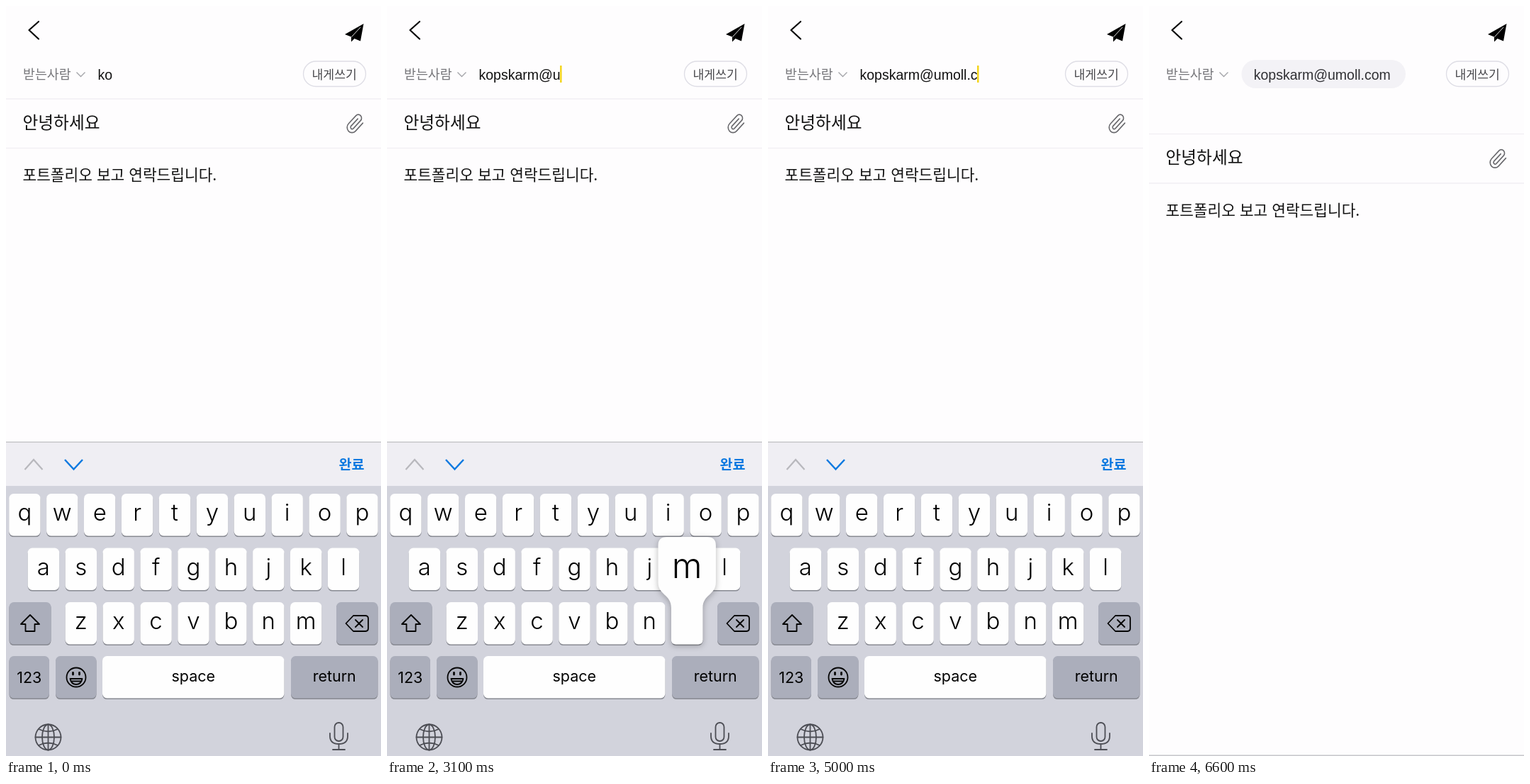
Recreate the animation shown at these times as an HTML page. Size 529 by 1058 pixels, loop 6700 ms.

```html
<!DOCTYPE html>
<html lang="ko">
<head>
<meta charset="utf-8">
<style>
  html, body { margin: 0; width: 100%; height: 100%; overflow: hidden; background: #fefdfe; }
  svg { display: block; width: 529px; height: 1058px; }
  .ko { font-family: "Noto Sans CJK KR", "Noto Sans CJK", sans-serif; font-weight: 350; }
  .key { font-family: Inter, Roboto, sans-serif; text-anchor: middle; }
  .thin { font-weight: 300; }
  .mail { font: 19.5px "Liberation Sans", Arial, sans-serif; }
  .line { fill: none; stroke: #050505; stroke-width: 1.8; stroke-linejoin: round; stroke-linecap: round; }
  #pop path { fill: #fefefe; filter: drop-shadow(0 2px 4px rgba(0, 0, 0, .28)); }
</style>
</head>
<body>
<svg id="stage" viewBox="0 0 529 1058">
  <path class="line" style="stroke-width:2.2" d="M46 22 32.5 34 46 46.5"/>
  <path d="M504.5 25 500 49.5 491.5 46 487 50.5V43.5L478 40Z"/>
  <path d="M500 30 487.5 43.5" stroke="#fefdfe" stroke-width=".9"/>
  <text class="ko" x="24" y="103" font-size="18.4" fill="#77777b">받는사람</text>
  <path d="M99.5 93.5l6 6 6-6" fill="none" stroke="#a5a5aa" stroke-width="1.4"/>
  <rect x="419.5" y="78" width="88" height="35.5" rx="17.7" fill="none" stroke="#dedde5" stroke-width="1.3"/>
  <text class="ko" x="431.5" y="102.5" font-size="17.2" fill="#47474b">내게쓰기</text>
  <rect id="chip" x="130.5" y="76" width="231.5" height="40" rx="20" fill="#f3f2f6"/>
  <text id="mail" class="mail" y="104"></text>
  <rect id="caret" y="84" width="2.5" height="24" fill="#f3d51c"/>
  <g id="letter">
    <path d="M0 131H529M0 200.5H529" stroke="#f1f0f4" stroke-width="1.3"/>
    <text class="ko" x="23.5" y="172.5" font-size="23.7" fill="#111">안녕하세요</text>
    <path transform="translate(479 151.5) scale(1.14 1.24)" fill="none" stroke="#68686c" stroke-width="1.4" stroke-linecap="round"
      d="M21.4 11l-9.2 9.2a6 6 0 0 1-8.5-8.5l9.2-9.2a4 4 0 0 1 5.7 5.7l-9.2 9.2a2 2 0 0 1-2.8-2.8l8.5-8.5"/>
    <text class="ko" x="23.5" y="246" font-size="21.4" fill="#111">포트폴리오 보고 연락드립니다.</text>
  </g>
  <g id="board">
    <rect y="614.5" width="529" height="63" fill="#efeef3"/>
    <rect y="614.5" width="529" height="1.5" fill="#c8c8cb"/>
    <rect y="677" width="529" height="381" fill="#d2d3dc"/>
    <path d="M26.5 654 39 640 51.5 654" fill="none" stroke="#b8b8bd" stroke-width="2.2"/>
    <path d="M83 640 95.5 653.5 108 640" fill="none" stroke="#0b79e0" stroke-width="2.5"/>
    <text id="done" class="ko" x="469.5" y="653.5" font-size="19.6" style="font-weight:700">완료</text>
    <g id="common"></g>
    <g id="abc"></g>
    <g id="sym"></g>
    <g id="icons" class="line">
      <path d="M490 860H507q4 0 4 4V878q0 4-4 4H490L479.5 871ZM493 866l10 10m0-10-10 10"/>
      <circle cx="99" cy="947" r="13.5"/>
      <path d="M90.5 949H107.5Q106 957 99 957T90.5 949ZM92 952.5H106"/>
      <path d="M94.5 940.5v2.5m9-2.5v2.5" stroke-width="2.8"/>
      <g style="stroke:#4d4e55">
        <circle cx="59.5" cy="1031.5" r="18"/>
        <ellipse cx="59.5" cy="1031.5" rx="8.5" ry="18"/>
        <path d="M59.5 1013.5v36M41.5 1031.5h36M46 1020q13.5 7 27 0M46 1043q13.5-7 27 0"/>
        <rect x="463.5" y="1011" width="12" height="26" rx="6"/>
        <path d="M457 1026v4q0 11 12.5 11T482 1030v-4M469.5 1041V1049M461 1049h17"/>
      </g>
    </g>
    <g id="pop"><path/><text class="key thin" font-size="49"/></g>
  </g>
</svg>
<script>
const $ = id => document.getElementById(id);
const LOOP = 6700, STEP = 100, PITCH = 52.9, ROWS = [688, 764.5, 841, 917];
const abc = $('abc'), sym = $('sym'), common = $('common');
const keys = {};

function add(parent, tag, attrs, text = '') {
  const node = document.createElementNS('http://www.w3.org/2000/svg', tag);
  for (const name in attrs) node.setAttribute(name, attrs[name]);
  node.textContent = text;
  return parent.appendChild(node);
}

function key(parent, x, row, w, label, size, drop, dark) {
  const y = ROWS[row], box = { x, width: w, height: 59.5, rx: 6.5 };
  add(parent, 'rect', { ...box, y: y + 1.6, fill: '#888a92' });
  add(parent, 'rect', { ...box, y, fill: dark ? '#abaebb' : '#fefefe' });
  add(parent, 'text', { class: size > 30 ? 'key thin' : 'key', x: x + w / 2, y: y + drop, 'font-size': size }, label);
  keys[label] = { x, y, w };
}

function keyRow(parent, chars, x, row, size, drop, w = 44.4, step = PITCH) {
  [...chars].forEach((c, i) => key(parent, x + i * step, row, w, c, size, drop));
}

keyRow(abc, 'qwertyuiop', 4.2, 0, 33, 38);
keyRow(abc, 'asdfghjkl', 30.7, 1, 33, 38);
keyRow(abc, 'zxcvbnm', 83.6, 2, 33, 38);
key(abc, 4.5, 2, 59, '', 20, 0, true);
key(abc, 4.5, 3, 56.5, '123', 21.5, 37.5, true);
add(abc, 'path', { class: 'line', d: 'M34 859 47 872H40.5V882H27.5V872H21Z' });
keyRow(sym, '1234567890', 4.2, 0, 30.5, 42);
keyRow(sym, '-/:;()$&@″', 4.2, 1, 30.5, 42);
keyRow(sym, '.,?!′', 83, 2, 30.5, 42, 65.5, 74.25);
key(sym, 4.5, 2, 59, '#+=', 19, 37, true);
key(sym, 4.5, 3, 56.5, 'ABC', 19.5, 37.5, true);
key(common, 466, 2, 58.5, '', 20, 0, true);
key(common, 70, 3, 57.5, '', 20, 0, true);
key(common, 136, 3, 256.5, 'space', 21.5, 35.5);
key(common, 402, 3, 122.5, 'return', 21.5, 35.5, true);

// Each character appears at its release time; the first two are already there.
const address = 'kopskarm@umoll.com';
const times = [-600, -600, 300, 550, 800, 1050, 1250, 1500, 2300,
  2900, 3200, 3500, 3700, 3900, 4400, 4800, 5200, 5400];

const show = (node, on) => node.style.display = on ? '' : 'none';
const within = (t, a, b) => t >= a && t < b;

function drawPopup(char) {
  show($('pop'), char);
  if (!char) return;
  const { x, y, w } = keys[char], wide = w + 37;
  const left = Math.min(x - 18.5, 524.5 - wide), right = left + wide, top = y - 92, end = x + w;
  const [path, label] = $('pop').children;
  path.setAttribute('d', `M${left + 12} ${top}H${right - 12}q12 0 12 12V${y - 28}
    C${right} ${y - 10} ${end} ${y - 11} ${end} ${y + 8}V${y + 53}q0 6.5-6.5 6.5H${x + 6.5}q-6.5 0-6.5-6.5V${y + 8}
    C${x} ${y - 11} ${left} ${y - 10} ${left} ${y - 28}V${top + 12}q0-12 12-12Z`);
  label.setAttribute('x', left + wide / 2);
  label.setAttribute('y', y - 34);
  label.textContent = char;
}

function draw(t) {
  const count = times.filter(at => at <= t).length;
  const sent = t >= 6450;
  const mail = $('mail'), textX = sent ? 147.7 : 129.5;
  mail.textContent = address.slice(0, count);
  mail.setAttribute('x', textX);
  mail.setAttribute('fill', sent ? '#303034' : '#111');
  $('caret').setAttribute('x', textX + mail.getComputedTextLength() - .6);
  show($('caret'), t < 6350 && (t - times[count - 1]) % 1000 < 550);

  show($('chip'), sent);
  $('letter').setAttribute('transform', `translate(0 ${sent ? 49.5 : 0})`);

  const symbols = within(t, 1700, 2600) || within(t, 4100, 4600);
  show(sym, symbols);
  show(abc, !symbols);
  drawPopup(address[times.findIndex(at => within(t, at - 100, at + 80))]);

  $('done').setAttribute('fill', t >= 6300 ? '#b0d3f1' : '#0b79e0');
  const p = Math.min(1, Math.max(0, (t - 6325) / 275));
  $('board').setAttribute('transform', `translate(0 ${442 * p * p * (3 - 2 * p)})`);
}

const start = performance.now();
function tick() {
  const t = (performance.now() - start) % LOOP;
  draw(Math.floor(t / STEP) * STEP);
  requestAnimationFrame(tick);
}
tick();
</script>
</body>
</html>
```
